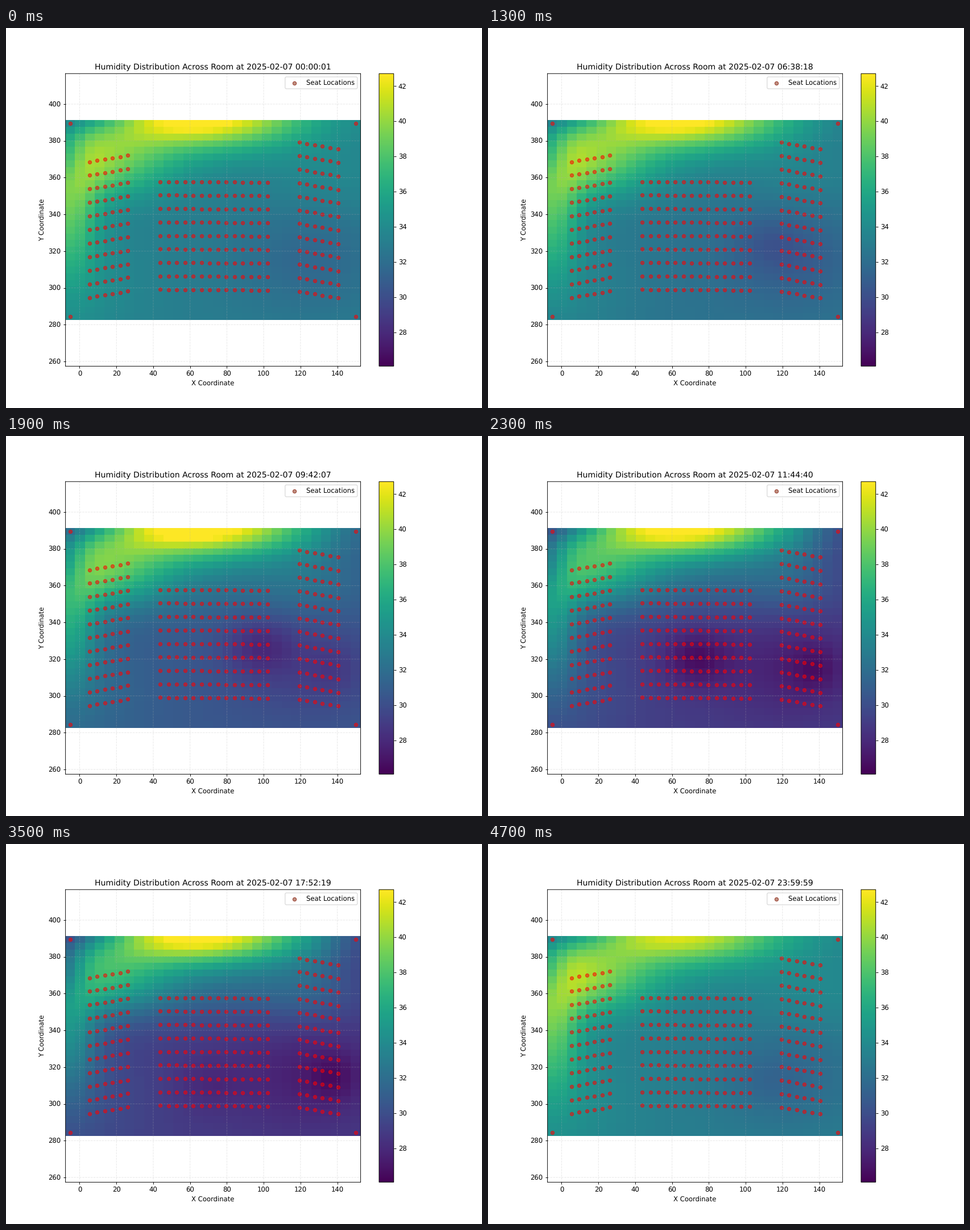
A matplotlib script that plays this animation: 837x669 px, repeating every 4.8 s.

```python
import numpy as np
import matplotlib.pyplot as plt
from matplotlib.animation import FuncAnimation

FRAMES, INTERVAL, CELLS = 48, 100, 30
LOW, HIGH = 26.08, 42.70

X, Y = np.meshgrid(np.linspace(-5, 150, CELLS), np.linspace(284.5, 389.5, CELLS))

# Key points over the day, joined by straight lines
TIMES = [0, 9, 16, 23, 29, 35, 47]
TRACKS = {
    "drying": [0, -.3, 1.2, 4, 3.3, 4.1, -.1],
    "vent": [10.3, 8.2, 12, 12.2, 11.1, 12.1, 8.4],
    "door": [5.8, 5.9, 6.6, 5.8, 5.5, 5.4, 6.3],
    "patch": [0, 0, 1.8, 2.2, 1, .8, .5],
    "patch_x": [112, 112, 116, 73, 90, 70, 112],
    "patch_y": [315, 315, 332, 321, 318, 311, 312],
}


def bump(cx, cy, rx, ry):
    return np.exp(-((X - cx) / rx) ** 2 / 2 - ((Y - cy) / ry) ** 2 / 2)


# Fixed shapes: vent along the back wall, door at the left, drier right side
vent = np.exp(-((X - 65) / 40) ** 2 / 2 - ((389.5 - Y) / 14) ** 1.5)
door = bump(10, 369, 28, 14)
walls = (5 * bump(-5, 345, 11, 28) + bump(5, 300, 25, 30) + .8 * bump(140, 360, 30, 14)
         - 3.3 * bump(0, 392, 22, 6) - 4 * bump(-7, 372, 8, 12)
         - 1.4 * bump(124, 316, 28, 20))

# Daytime drying is halved in the upper middle of the room
upper = 1 / (1 + np.exp((348 - Y) / 6))
inner = np.exp(-((X - 72) / 68) ** 8)
drying = 1 - .55 * upper * inner + .3 * bump(138, 315, 9, 9)


def humidity(i):
    now = {name: np.interp(i, TIMES, values) for name, values in TRACKS.items()}
    patch = bump(now["patch_x"], now["patch_y"], 13, 11)
    return (33 + walls + now["vent"] * vent + now["door"] * door
            - now["drying"] * drying - now["patch"] * patch)


def title(i):
    s = 1 + i * 86398 // (FRAMES - 1)
    clock = f"{s // 3600:02d}:{s // 60 % 60:02d}:{s % 60:02d}"
    return f"Humidity Distribution Across Room at 2025-02-07 {clock}"


def block(x0, x1, cols, top, bottom, rows, tilt):
    """A bank of seats whose rows rise by tilt from left to right."""
    sx, sy = np.meshgrid(np.linspace(x0, x1, cols), np.linspace(top, bottom, rows))
    return np.column_stack([sx.ravel(), (sy + tilt * (sx - x0) / (x1 - x0)).ravel()])


seats = np.vstack([
    block(5.3, 26.2, 6, 368.6, 294.7, 11, 3.5),
    block(43.8, 102, 14, 357.8, 299.1, 9, -.4),
    block(119.3, 140.3, 6, 379.2, 298.1, 12, -3.6),
    block(-5, 150, 2, 389.5, 284.5, 2, 0),
])

plt.rcParams.update({"font.family": "DejaVu Sans", "text.hinting": "no_hinting",
                     "path.snap": False})
fig, ax = plt.subplots(figsize=(10, 7.993), dpi=83.7)
mesh = ax.pcolormesh(X, Y, humidity(0), cmap="viridis", vmin=LOW, vmax=HIGH,
                     shading="nearest")
fig.colorbar(mesh, ax=ax)
ax.scatter(*seats.T, s=28, c="red", alpha=0.55, label="Seat Locations")
ax.grid(True, linestyle="--", alpha=0.3)
ax.set(xlabel="X Coordinate", ylabel="Y Coordinate",
       xlim=(-7.67, 152.67), ylim=(257.4, 416.6))
heading = ax.set_title(title(0))

key = ax.legend(loc="upper right").legend_handles[0]
key.set(alpha=1, facecolor="#bf8f80", edgecolor="#a04a3c")


def update(i):
    mesh.set_array(humidity(i))
    heading.set_text(title(i))
    return mesh, heading


anim = FuncAnimation(fig, update, frames=FRAMES, interval=INTERVAL,
                     repeat=True, repeat_delay=0, blit=False)
plt.show()
```
